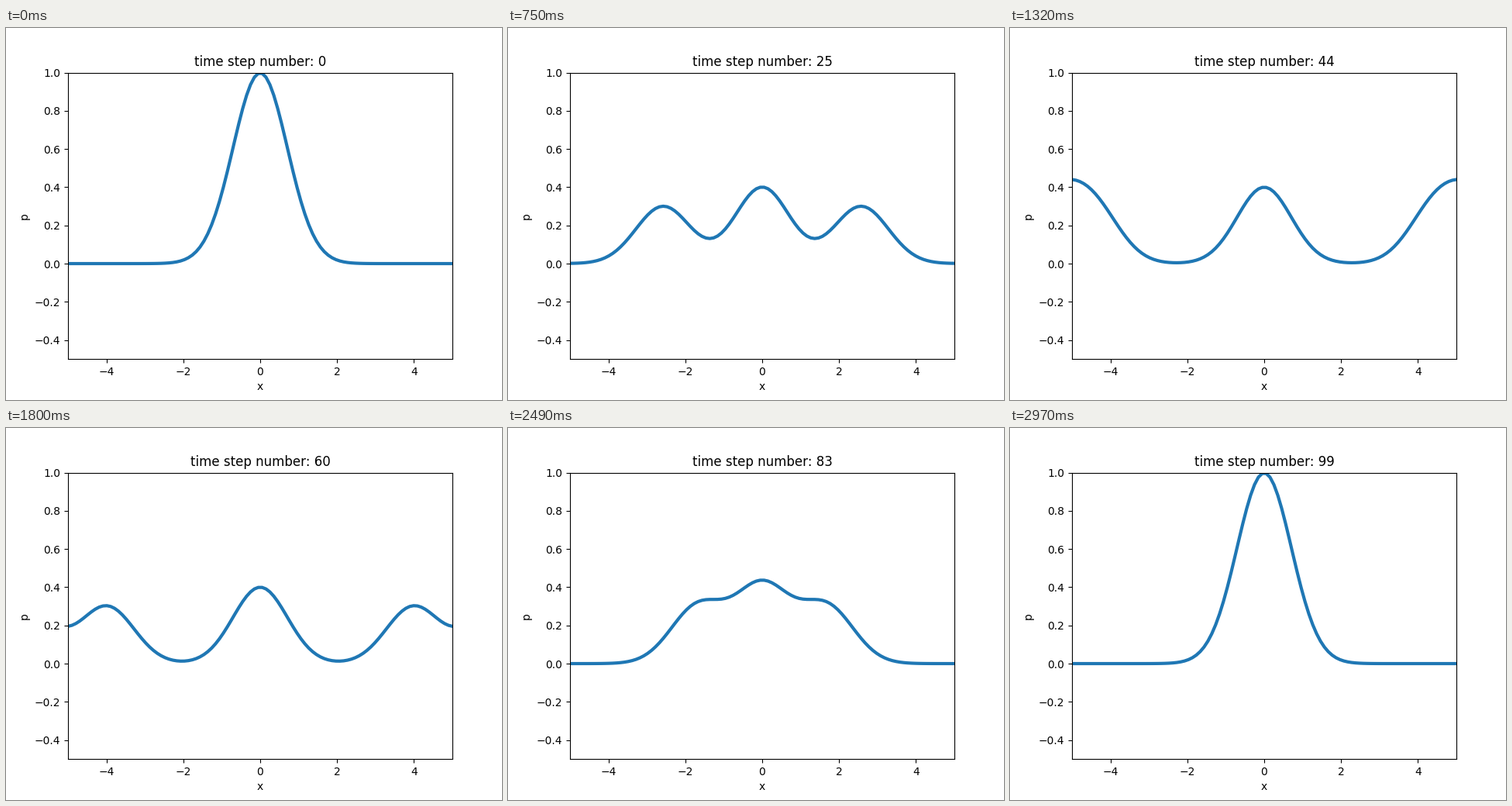
Recreate the animation shown at these times as a matplotlib script. Size 640 px wide and 480 px high, loop 3 s.

```python
import numpy as np
import matplotlib.pyplot as plt
from matplotlib.animation import FuncAnimation

STEPS = 100
x = np.linspace(-5, 5, 100)
dx = x[1] - x[0]
period = len(x) * dx


def bump(center):
    """Unit Gaussian on a periodic domain."""
    d = (x - center + period / 2) % period - period / 2
    return np.exp(-d**2)


def pressure(n):
    # a standing part plus two pulses that run one cell per step
    shift = (n + 0.5) * dx
    return 0.4 * bump(0) + 0.3 * (bump(shift) + bump(-shift))


fig, ax = plt.subplots(figsize=(6.4, 4.8), dpi=100)
line, = ax.plot(x, pressure(0), lw=3)
ax.set(xlim=(-5, 5), ylim=(-0.5, 1), xlabel="x", ylabel="p")
title = ax.set_title("time step number: 0")


def update(n):
    line.set_ydata(pressure(n))
    title.set_text(f"time step number: {n}")
    return line, title


anim = FuncAnimation(fig, update, frames=STEPS, interval=30,
                     repeat=True, repeat_delay=0, blit=False)
plt.show()
```
